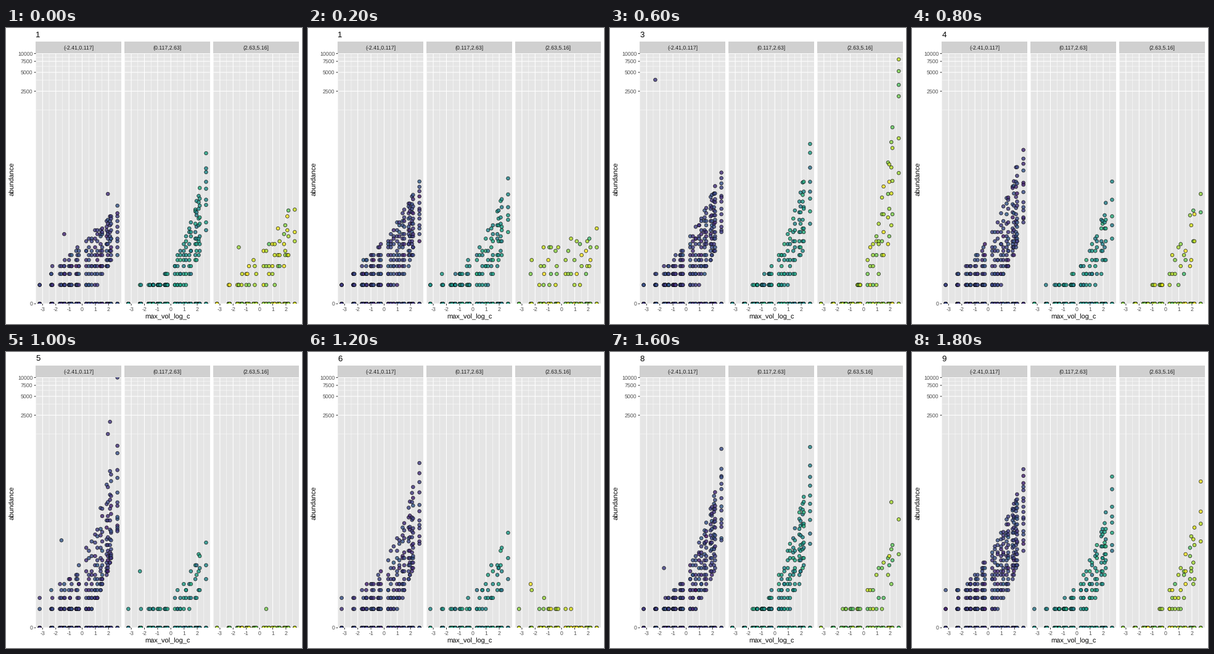
A matplotlib script for the animation above (2000 ms loop, 480 by 480 pixels).

```python
import numpy as np
import matplotlib as mpl
import matplotlib.pyplot as plt
from matplotlib.animation import FuncAnimation
from matplotlib.patches import Rectangle

SIZE, DPI, FRAMES, INTERVAL = 480, 72, 10, 200
LEFTS, WIDTH, TOP, BOTTOM = (48.4, 192.2, 336.0), 138.6, 41.4, 447.2
STRIPS = ("(-2.41,0.117]", "(0.117,2.63]", "(2.63,5.16]")
COUNTS = (0, 2500, 5000, 7500, 10000)

# Trait value of each species: one column of points per species
TRAITS = np.array([-3.22, -2.34, -2.26, -1.68, -1.57, -1.36, -1.32, -1.0, -0.92,
                   -0.8, -0.45, -0.36, -0.25, 0.31, 0.51, 0.72, 0.98, 1.15, 1.4,
                   1.52, 1.86, 1.95, 2.11, 2.19, 2.67])

plt.rcParams["font.family"] = "Liberation Sans"
plt.rcParams["text.hinting"] = "none"


def x_px(panel, trait):
    return LEFTS[panel] + 75.1 + 21.4 * trait


def y_px(count):
    return BOTTOM - (BOTTOM - TOP) * np.log1p(count) / np.log1p(10000)


def cloud(n, left, right, bend, skew=1):
    """Points per column, highest count at either end, curve of the top edge."""
    return np.array([n, np.log1p(left), np.log1p(right), bend, skew])


# Year: (one cloud per panel, tint of the last panel, outliers by panel)
YEARS = {
    0: ((cloud(10, 2, 36, 1.3), cloud(8, 0.6, 200, 2.7), cloud(3, 1.5, 50, 2)),
        0.9, [(0, 1.95, 56), (0, -1.36, 12), (1, 2.67, 254), (2, -1.57, 7)]),
    2: ((cloud(15, 2, 230, 2), cloud(4, 3, 57, 2.4), cloud(1, 20, 4, 0.7)),
        0.85, [(0, 2.67, 260), (1, 2.67, 57), (2, -3.22, 27), (2, 2.67, 7)]),
    3: ((cloud(13, 1.5, 135, 1.8), cloud(7, 0.5, 300, 2.5), cloud(4, 0, 8000, 3.2)),
        0.87, [(0, -2.34, 3800), (1, 2.67, 358), (2, 2.67, 8060), (2, 2.67, 5230)]),
    5: ((cloud(13, 3, 1200, 2.5, 2), cloud(3, 0.7, 27, 2.5), cloud(0, 0, 0, 1)),
        0.88, [(0, 2.67, 10000), (0, 2.11, 1960), (0, 1.95, 1250),
               (0, -1.57, 24), (1, -2.34, 7), (2, 0.51, 1)]),
    7: ((cloud(11, 2, 180, 2.4), cloud(3, 0.8, 40, 2), cloud(1, 80, 0, 0.6)),
        0.97, [(0, 2.67, 202), (1, 2.67, 119), (2, -3.22, 91), (2, -2.34, 27)]),
    8: ((cloud(13, 1, 420, 2.3), cloud(9, 0.3, 450, 2.4), cloud(2, 0.5, 90, 2.5)),
        0.8, [(0, 2.67, 723), (0, -1.68, 8), (1, 2.67, 774), (2, 2.11, 101)]),
    9: ((cloud(16, 3, 280, 2), cloud(7, 0.7, 180, 2.5), cloud(3, 0, 150, 2.5)),
        0.88, [(0, 2.67, 342), (1, 2.67, 260), (2, 2.67, 217)]),
}


def year(step):
    """The given year, or the middle between its neighbours."""
    if step in YEARS:
        return YEARS[step]
    before = YEARS[max(k for k in YEARS if k < step)]
    after = YEARS[min(k for k in YEARS if k > step)]
    clouds = [(a + b) / 2 for a, b in zip(before[0], after[0])]
    return clouds, (before[1] + after[1]) / 2, []


def panel_points(step, panel):
    clouds, warmth, outliers = year(step)
    n, start, end, bend, skew = clouds[panel]
    rng = np.random.default_rng(100 * step + panel)
    places = [(t, 0) for t in TRAITS for _ in range((3, 3, 2)[panel])]
    for trait in TRAITS:
        u = (trait - TRAITS[0]) / np.ptp(TRAITS)
        high = start + (end - start) * u ** bend
        low = 0.5 * high * u ** 2
        k = int(np.ceil(n * (0.3 + 0.7 * u)))
        share = (np.arange(k) + rng.random(k)) / max(k, 1)
        counts = np.rint(np.expm1(low + (high - low) * share ** skew))
        places += [(trait, c) for c in rng.permutation(counts)]
    places += [(t, c) for p, t, c in outliers if p == panel]
    trait, count = np.array(places).T

    mean, spread, dark, light = ((0.2, 0.05, 0.03, 0.3), (0.52, 0.06, 0.34, 0.64),
                                 (warmth, 0.07, 0.7, 1.0))[panel]
    tint = np.clip(rng.normal(mean, spread, len(trait)), dark, light)
    colors = mpl.colormaps["viridis"](tint)
    colors[:, 3] = 0.82
    return np.column_stack((x_px(panel, trait), y_px(count))), colors


POINTS = [[panel_points(i, p) for p in range(3)] for i in range(FRAMES)]

fig = plt.figure(figsize=(SIZE / DPI, SIZE / DPI), dpi=DPI, facecolor="white")
ax = fig.add_axes([0, 0, 1, 1])
ax.set(xlim=(0, SIZE), ylim=(SIZE, 0))
ax.axis("off")


def line(xs, ys, color, width, clip=None):
    art, = ax.plot(xs, ys, color=color, lw=width, solid_capstyle="butt",
                   snap=False, zorder=2)
    if clip is not None:
        art.set_clip_path(clip)


def label(x, y, text, size, color, ha="center", va="baseline", **kw):
    return ax.text(x, y, text, fontsize=size, color=color, ha=ha, va=va, **kw)


dots = []
for p, left in enumerate(LEFTS):
    right = left + WIDTH
    ax.add_patch(Rectangle((left, 22), WIDTH, TOP - 22, fc="#D0D0D0", lw=0))
    box = ax.add_patch(Rectangle((left, TOP), WIDTH, BOTTOM - TOP, fc="#E5E5E5", lw=0))
    label(left + WIDTH / 2, 35, STRIPS[p], 8.8, "#1A1A1A")
    for count in range(1250, 10000, 2500):
        line((left, right), [y_px(count)] * 2, "white", 0.53, box)
    for half in np.arange(-3.5, 3, 1):
        line([x_px(p, half)] * 2, (TOP, BOTTOM), "white", 0.53, box)
    for count in COUNTS:
        line((left, right), [y_px(count)] * 2, "white", 1.07, box)
    for unit in range(-3, 3):
        x = x_px(p, unit)
        line((x, x), (TOP, BOTTOM), "white", 1.07, box)
        line((x, x), (BOTTOM, BOTTOM + 2.75), "#333333", 1.07)
        label(x, 459, f"{unit}", 8.8, "#4D4D4D")
    dot = ax.scatter([], [], s=5.6 ** 2, linewidths=0.75,
                     edgecolors=(0, 0, 0, 0.82), zorder=3)
    dot.set_clip_path(box)
    dots.append(dot)

for count in COUNTS:
    y = y_px(count)
    line((LEFTS[0] - 2.75, LEFTS[0]), (y, y), "#333333", 1.07)
    label(43.5, y + 3.2, f"{count}", 8.8, "#4D4D4D", ha="right")

label(261.5, 471.5, "max_vol_log_c", 11, "black")
label(10.5, 244.3, "abundance", 11, "black", va="center", rotation=90)
title = label(48.3, 15, "1", 13.2, "black", ha="left")


def update(i):
    title.set_text(f"{1 + 8 * i // 9}")
    for dot, (places, colors) in zip(dots, POINTS[i]):
        dot.set_offsets(places)
        dot.set_facecolors(colors)
    return [title, *dots]


anim = FuncAnimation(fig, update, frames=FRAMES, interval=INTERVAL,
                     repeat=True, repeat_delay=0)
plt.show()
```
